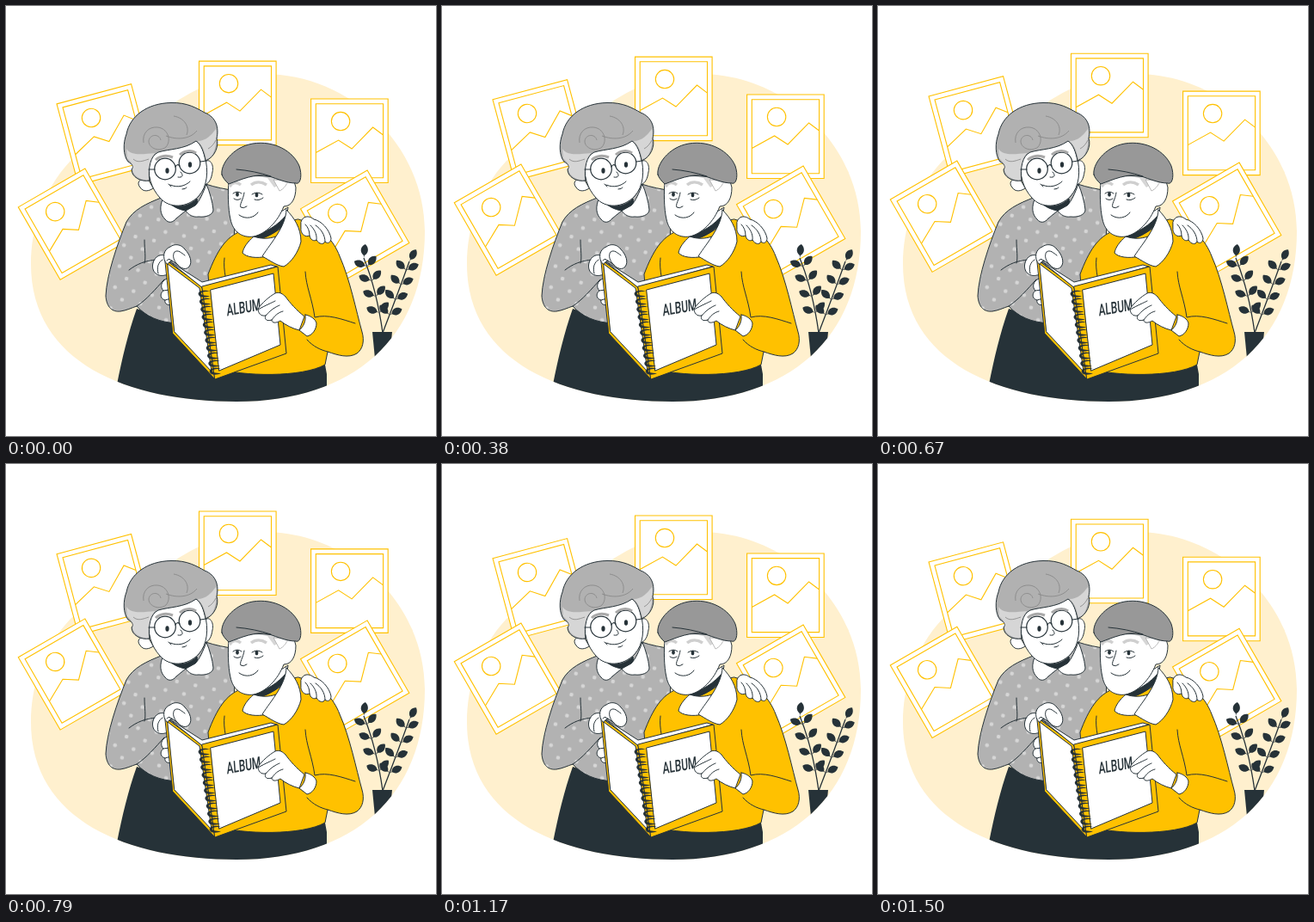
Animation, 500 px wide and 500 px high, one loop 1.54 s. Source, as an HTML page:

```html
<!DOCTYPE html>
<html lang="en">
<head>
<meta charset="utf-8">
<title>Album</title>
<style>
html, body { margin: 0; width: 100%; height: 100%; overflow: hidden; background: #fff; }
svg { display: block; width: 100vw; height: 100vh; }
.ink { stroke: #263238; stroke-width: 1; stroke-linejoin: round; stroke-linecap: round; }
.line { fill: none; }
.skin { fill: #fff; }
.gold { fill: #ffc100; }
.dark { fill: #263238; }
.grey { fill: #b1b1b1; }
.pale { fill: #d6d6d6; }
#cards { fill: #fff; stroke: #ffc100; stroke-width: 1.1; }
</style>
</head>
<body>
<svg viewBox="0 0 500 500">
  <defs>
    <path id="blob" d="M29 300C29 260 42 215 75 180C110 150 150 140 195 113C230 90 262 79 300 79C400 79 487 162 487 262C487 385 405 460 268 460C142 460 29 415 29 300Z"/>
    <clipPath id="floor"><use href="#blob"/></clipPath>
    <pattern id="dots" width="22" height="25" patternUnits="userSpaceOnUse" patternTransform="rotate(12)">
      <rect width="22" height="25" fill="#b2b2b2"/>
      <circle cx="5" cy="6" r="2.300" fill="#d6d6d6"/>
      <circle cx="16" cy="18.500" r="2.300" fill="#d6d6d6"/>
    </pattern>
    <g id="card">
      <path d="M0 0H89.600V97.500H0ZM5.700 5.700H84V91.700H5.700Z"/>
      <circle cx="34.500" cy="26" r="10.700"/>
      <path fill="none" d="M5.700 62.500L32 48L47.500 58L72 33L84 42"/>
    </g>
  </defs>

  <use href="#blob" fill="#fff0ce"/>
  <g id="cards">
    <use href="#card" transform="translate(224.500 64.300)"/>
    <use href="#card" transform="translate(354.600 108.200)"/>
    <use href="#card" transform="translate(59 114) rotate(-15)"/>
    <use href="#card" transform="translate(14.300 234) rotate(-30)"/>
    <use href="#card" transform="translate(342.500 236) rotate(-30)"/>
  </g>

  <g id="plant" class="dark" clip-path="url(#floor)">
    <path d="M426 379H449L446 410H429Z"/>
  </g>

  <!-- clothes at the bottom -->
  <path class="dark" clip-path="url(#floor)" d="M152 352C142 380 135 410 129 440L200 470H373V428L371 417L270 400L195 366Z"/>

  <!-- woman -->
  <g class="ink">
    <path fill="url(#dots)" d="M183 222C162 230 148 237 140 251C129 278 117 313 116 337C117 351 124 356 133 355C140 354 146 351 152 349C163 361 178 368 200 369L262 330L268 215C255 213 244 211 232 207Z"/>
    <path class="line" d="M152 349C163 342 174 329 184 318M161 272C161 284 163 293 161 299M143 307C152 300 162 296 175 295"/>
    <path class="dark" d="M188 229C200 236 213 233 222 224L223 232C214 240 201 240 190 235Z"/>
    <path class="skin" d="M183 222C178 234 179 242 185 248C189 253 194 252 198 247L209 238C201 237 190 232 183 222Z"/>
    <path class="skin" d="M233 207C229 218 225 227 220 232L209 238C212 243 218 246 224 245C232 246 241 243 241 237C240 227 237 217 233 207Z"/>
    <path class="skin" d="M164 200C156 200 151 205 156 211C160 217 167 215 171 212ZM231 181C238 176 242 186 240 193C239 200 237 206 231 208Z"/>
    <path class="skin" d="M166 176C164 198 169 212 179 223C190 236 211 235 224 221C234 210 236 192 231 174L226 156H186Z"/>
    <path class="grey" d="M167 203C157 205 146 199 146 190C149 187 147 184 142 181C136 174 136 159 140 149C144 128 164 113 192 112.500C211 112 222 119 231 124C244 129 248 141 245 154C248 162 243 176 232 180C230 170 227 161 221 157C207 167 190 166 177 170C168 174 165 188 167 203Z"/>
  </g>
  <path class="pale" d="M140 166C146 175 160 172 173 171C166 179 165 190 166 202C157 203 148 198 147 190C150 186 145 181 141 177ZM223 157C232 157 239 150 244 143C246 150 243 155 244 159C243 170 239 177 233 178C231 169 229 163 223 157Z"/>
  <g fill="none" stroke="#858585" stroke-width=".8">
    <path d="M160 159C158 148 166 140 176 141C188 142 193 156 186 164C179 170 166 166 166 157C167 149 178 148 180 156M195 128C207 130 214 140 210 150M186 151C199 156 214 155 222 145M148 178C153 183 160 180 166 178M235 166C239 164 242 160 244 156"/>
  </g>
  <g class="ink">
    <g class="line" stroke-width="1.200">
      <circle cx="185" cy="189.500" r="12.300"/>
      <circle cx="213.500" cy="182.500" r="12.300"/>
      <path d="M197 187Q199 183 202 186M173 190L166 190M226 181L233 180"/>
    </g>
    <path class="line" d="M203 193C207 197 205 200 200 199M191 208C200 212 209 209 214 204M189 207L192 210M205 213Q209 213 210 211"/>
  </g>
  <g class="dark">
    <ellipse cx="187.500" cy="191.500" rx="2.100" ry="3.300"/>
    <ellipse cx="214" cy="184.500" rx="2.100" ry="3.300"/>
  </g>
  <path fill="none" stroke="#a9a9a9" stroke-width="3" d="M174 179C179 174 187 173 194 176M202 173C207 168 216 167 221 171"/>

  <!-- man -->
  <g class="ink">
    <path class="gold" d="M273 262C256 268 245 285 235 312L243 421C275 431 345 432 371 417L374 402C386 406 398 410 408 404C415 399 417 389 414 379C407 354 400 318 388 291C381 272 365 255 340 248Z"/>
    <path class="line" d="M348 309C349 327 356 340 359 362C374 358 390 364 406 369M254 293C253 300 254 308 255 314M374 402C366 400 357 396 350 388"/>
    <path class="skin" d="M289 258L328 234L325 254C313 265 300 270 288 268Z"/>
    <path class="dark" d="M288 267C302 264 317 254 326 243L324 253C314 264 302 270 291 272Z"/>
    <path class="skin" d="M288 268C281 274 276 281 275 287C279 292 291 294 304 291L314 268C305 271 297 271 288 268Z"/>
    <path class="skin" d="M326 237C325 257 309 274 298 291C307 296 315 302 323 303C332 298 340 286 343 274C343 258 335 246 326 237Z"/>
    <path class="skin" d="M259 203C258 217 258 235 261 248C264 263 275 270 288 268C302 265 316 251 323 233C332 233 337 224 337 211L334 200L270 196Z"/>
  </g>
  <path class="pale" d="M259 204C270 199 285 197 304 200L312 211L326 202L320 199L260 199Z"/>
  <path class="skin" stroke="#a9a9a9" stroke-width=".8" d="M311 202L318 215C323 213 327 207 328 203Z"/>
  <path fill="none" stroke="#cfcfcf" stroke-width="3.500" d="M260 210C263 205 268 204 273 208M285 208C290 204 297 204 303 208"/>
  <g class="ink">
    <path fill="#989898" d="M251 196C249 185 263 164 287 160C312 156 334 169 341 186C345 198 342 208 337 206C326 206 316 201 306 198C290 194 273 202 259 207C255 203 252 200 251 196Z"/>
    <path class="line" d="M268 190C281 191 296 194 308 198"/>
    <path class="line" d="M277 217C276 225 271 231 273 234Q276 236 280 233M271 243C279 249 289 246 293 240M264 218Q269 214 274 218M286 219Q292 215 298 219M265 224Q269 227 273 224M289 225Q294 227 299 223"/>
  </g>
  <g class="dark"><ellipse cx="269" cy="219" rx="1.900" ry="2.700"/><ellipse cx="291.500" cy="219.500" rx="1.900" ry="2.700"/></g>

  <!-- hand on the shoulder -->
  <g class="ink" transform="translate(-2 0)">
    <path class="skin" d="M345 251C347 244 354 243 360 248C369 250 378 260 380 270C380 275 376 277 373 274C371 278 366 277 363 272C360 274 356 272 355 267C350 269 346 266 345 261Z"/>
    <path class="line" d="M355 267C355 261 353 257 350 254M363 272C364 265 360 259 356 255M373 274C373 266 368 259 362 255"/>
  </g>

  <!-- album -->
  <g class="ink">
    <path class="skin" d="M185 313C175 316 167 307 172 296C176 288 184 288 190 293L192 312Z"/>
    <path class="line" d="M177 311C175 304 177 298 182 295"/>
    <path class="skin" d="M187 317C180 320 179 327 183 331C178 335 180 341 185 342C184 346 188 349 194 347L198 330Z"/>
    <path class="line" d="M183 331L190 330M185 342L192 340"/>
    <path class="gold" d="M185 295L228 326L243 434L194 381Z"/>
    <path class="skin" d="M188 300L225 328L239 425L196 379Z"/>
    <path class="skin" d="M189 296L228 321L308 301L315 303L228 327Z"/>
    <path class="gold" d="M228 326L316 303L326 404L243 434Z"/>
    <path class="skin" d="M238 330L311 311L319 394L248 424Z"/>
  </g>
  <g id="rings" class="dark"></g>
  <!-- lettering lies on the tilted page -->
  <text class="dark" transform="matrix(.62 -.11 .07 1 257 360.500)" font-family="Roboto, 'Liberation Sans', sans-serif" font-size="19" font-weight="500">ALBUM</text>

  <g class="ink">
    <path class="skin" d="M187 300C181 293 183 283 191 280C196 276 204 277 208 283C214 289 217 298 213 303C210 307 204 306 200 301L193 296Z"/>
    <path class="line" d="M200 301C195 297 193 290 196 286C200 283 204 287 208 290M187 296Q190 292 193 297"/>
    <path class="skin" d="M293 352C298 345 306 338 313 334C318 332 322 335 325 338C330 345 338 354 347 361L341 377C333 375 325 371 319 366C314 369 309 369 309 365C303 367 300 364 302 360C296 361 293 357 293 352Z"/>
    <path class="line" d="M302 360C307 354 313 350 318 348M309 365C314 358 318 356 322 355M293 353C302 348 309 345 313 343"/>
    <path class="skin" d="M348 359C354 360 360 364 361 369C361 376 356 383 350 384L341 377C346 373 349 366 348 359Z"/>
  </g>
</svg>
<script>
const LOOP = 1540, PEAK = 740, RISE = 10;
const get = id => document.getElementById(id);

function add(parent, d, attrs = {}) {
  const p = document.createElementNS('http://www.w3.org/2000/svg', 'path');
  p.setAttribute('d', d);
  for (const k in attrs) p.setAttribute(k, attrs[k]);
  parent.append(p);
}

function leaf(x, y, angle) {
  add(get('plant'), 'M0 0L3 -.5C6 -6 13 -5.500 16 0C12 5 6 5 3 .5Z',
    { transform: `translate(${x} ${y}) rotate(${angle})` });
}

// stem from the pot, with leaves on both sides and one at the tip
function stem(cx, cy, x, y, tilt) {
  const at = (t, a, b, c) => (1 - t) ** 2 * a + 2 * t * (1 - t) * b + t * t * c;
  add(get('plant'), `M438 380Q${cx} ${cy} ${x} ${y}`, { fill: 'none', stroke: '#263238', 'stroke-width': 1.3 });
  for (let i = 0; i < 4; i++) {
    const t = .24 + i * .21;
    const px = at(t, 438, cx, x), py = at(t, 380, cy, y);
    leaf(px, py, tilt - 155);
    leaf(px, py, tilt - 45);
  }
  leaf(x, y, tilt - 80);
}
stem(431, 330, 416, 293, -3);
stem(455, 336, 469, 297, 20);

for (let i = 0; i < 11; i++) {
  const x = 231 + i * 1.3, y = 334 + i * 9;
  add(get('rings'), `M${x + 6} ${y - 2}C${x - 2} ${y - 5} ${x - 9} ${y - 2} ${x - 7} ${y + 2}C${x - 5} ${y + 6} ${x + 2} ${y + 5} ${x + 6} ${y + 3}C${x} ${y + 3} ${x - 5} ${y + 2} ${x - 4} ${y}C${x - 3} ${y - 2} ${x + 2} ${y - 2} ${x + 6} ${y - 2}Z`);
}

function draw(now) {
  const t = now % LOOP;
  const drop = Math.min(RISE, Math.abs(t - PEAK) / 75);
  get('cards').setAttribute('transform', `translate(0 ${drop - RISE})`);
}

const start = performance.now();
function tick() {
  draw(performance.now() - start);
  requestAnimationFrame(tick);
}
tick();
</script>
</body>
</html>
```
